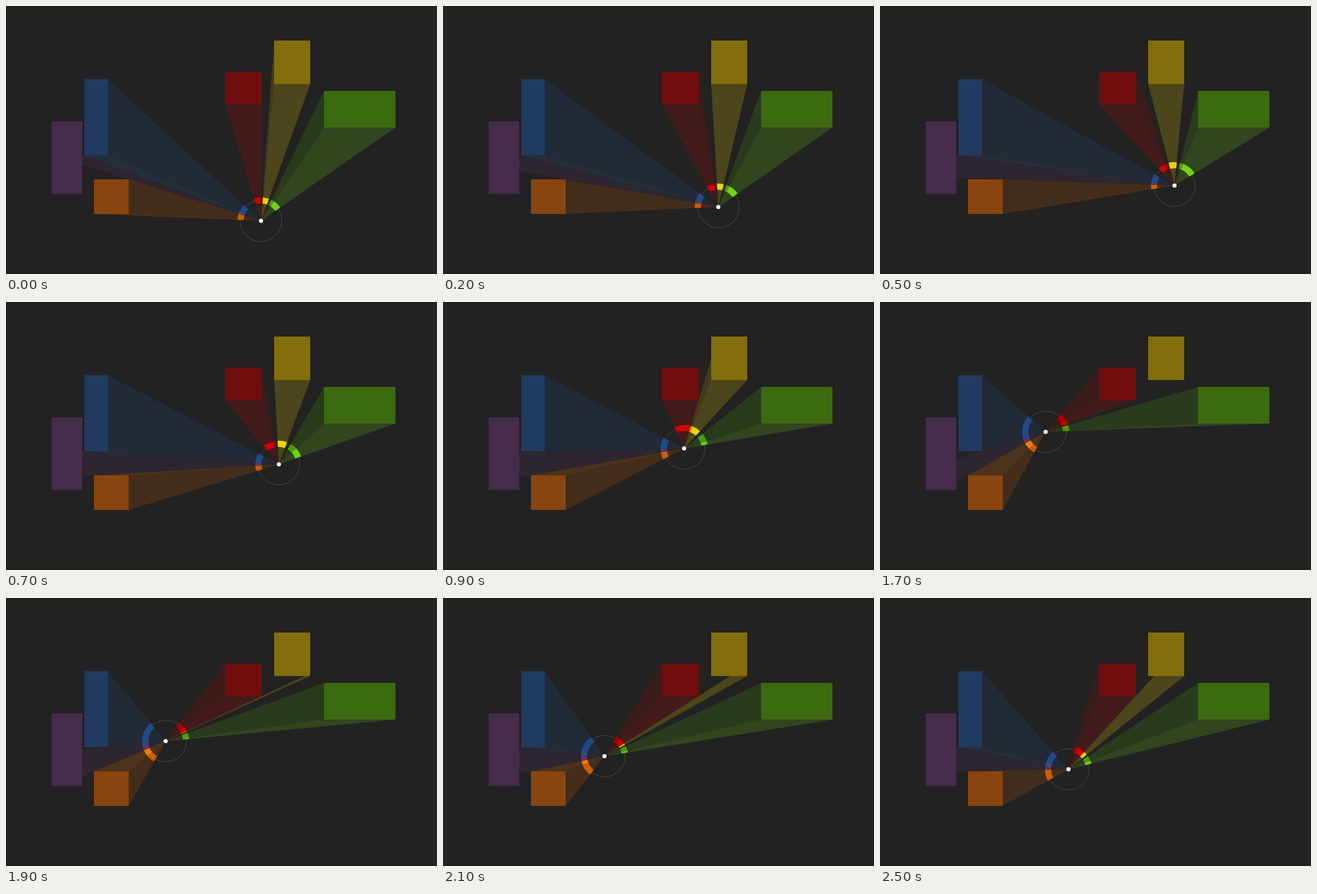
Write an HTML page with a canvas that moves like this. It is 622x388 px and loops after 2.6 s.

```html
<!DOCTYPE html>
<html lang="en">
<head>
<meta charset="utf-8">
<title>Line of sight</title>
<style>
  html, body { margin: 0; width: 100%; height: 100%; overflow: hidden; background: #222; }
  canvas { display: block; }
</style>
</head>
<body>
<canvas id="stage" width="622" height="388"></canvas>
<script>
const ctx = document.getElementById('stage').getContext('2d');
const LOOP = 2600, STEP = 100;

// x, y, width, height, dark tone (body and side faces), light tone (top and bottom faces)
const blocks = [
  [66, 167, 44, 105, '#5c3566', '#75507b'],
  [113, 106, 34, 110, '#204a87', '#3465a4'],
  [127, 251, 50, 50, '#ce5c00', '#f57900'],
  [316, 95, 53, 47, '#a40000', '#cc0000'],
  [387, 50, 52, 63, '#c4a000', '#edd400'],
  [459, 123, 103, 53, '#4e9a06', '#73d216']
];

// time, x, y of the eye
const path = [
  [0, 368, 311], [500, 425, 260], [900, 348, 212], [1300, 290, 190],
  [1700, 239, 188], [2100, 233, 229], [2500, 272, 248]
];

function slope(i, axis) {
  const a = path[Math.max(i - 1, 0)], b = path[Math.min(i + 1, path.length - 1)];
  return (b[axis] - a[axis]) / (b[0] - a[0]);
}

function eyeAt(time) {
  let i = 0;
  while (i < path.length - 2 && time >= path[i + 1][0]) i++;
  const p = path[i], q = path[i + 1], span = q[0] - p[0];
  const u = (time - p[0]) / span, v = 1 - u;
  return [1, 2].map(axis =>
    p[axis] * v * v * (1 + 2 * u) + q[axis] * u * u * (1 + 2 * v) +
    span * u * v * (slope(i, axis) * v - slope(i + 1, axis) * u));
}

// Faces turned towards the eye, as angular ranges (0 is up, clockwise)
function facesFrom(ex, ey) {
  const faces = [];
  const angle = (x, y) => Math.atan2(x - ex, ey - y);
  function add(x1, y1, x2, y2, color) {
    const [from, to] = [angle(x1, y1), angle(x2, y2)].sort((a, b) => a - b);
    const dist = x1 === x2
      ? t => (x1 - ex) / Math.sin(t)
      : t => (ey - y1) / Math.cos(t);
    faces.push({ from, to, dist, color });
  }
  for (const [x, y, w, h, dark, light] of blocks) {
    const r = x + w, b = y + h;
    if (ex < x) add(x, y, x, b, dark);
    if (ex > r) add(r, y, r, b, dark);
    if (ey < y) add(x, y, r, y, light);
    if (ey > b) add(x, b, r, b, light);
  }
  return faces;
}

// The nearest face in each direction, joined into continuous spans
function visibleSpans(faces) {
  const stops = faces.flatMap(f => [f.from, f.to]).sort((a, b) => a - b);
  const spans = [];
  for (let i = 1; i < stops.length; i++) {
    const from = stops[i - 1], to = stops[i], mid = (from + to) / 2;
    if (to - from < 1e-6) continue;
    let face = null;
    for (const f of faces) {
      if (f.from < mid && mid < f.to && (!face || f.dist(mid) < face.dist(mid))) face = f;
    }
    const last = spans[spans.length - 1];
    if (last && last.face === face) last.to = to;
    else spans.push({ face, from, to });
  }
  return spans.filter(s => s.face);
}

function draw(time) {
  const [ex, ey] = eyeAt(time);
  const spans = visibleSpans(facesFrom(ex, ey));

  ctx.globalAlpha = 1;
  ctx.fillStyle = '#222';
  ctx.fillRect(0, 0, 622, 388);

  ctx.globalAlpha = 0.6;
  for (const [x, y, w, h, dark] of blocks) {
    ctx.fillStyle = dark;
    ctx.fillRect(x, y, w, h);
  }

  ctx.globalAlpha = 0.2;
  for (const { face, from, to } of spans) {
    ctx.fillStyle = face.color;
    ctx.beginPath();
    ctx.moveTo(ex, ey);
    for (const t of [from, to]) {
      const d = face.dist(t);
      ctx.lineTo(ex + d * Math.sin(t), ey - d * Math.cos(t));
    }
    ctx.fill();
  }

  ctx.globalAlpha = 1;
  ctx.strokeStyle = '#444';
  ctx.lineWidth = 1;
  ctx.beginPath();
  ctx.arc(ex, ey, 30, 0, 2 * Math.PI);
  ctx.stroke();

  ctx.lineWidth = 9;
  for (const { face, from, to } of spans) {
    ctx.strokeStyle = face.color;
    ctx.beginPath();
    ctx.arc(ex, ey, 29.5, from - Math.PI / 2, to - Math.PI / 2);
    ctx.stroke();
  }

  ctx.fillStyle = '#fff';
  ctx.beginPath();
  ctx.arc(ex, ey, 3, 0, 2 * Math.PI);
  ctx.fill();
}

const start = performance.now();
function tick() {
  const time = (performance.now() - start) % LOOP;
  draw(Math.floor(time / STEP) * STEP);
  requestAnimationFrame(tick);
}
tick();
</script>
</body>
</html>
```
